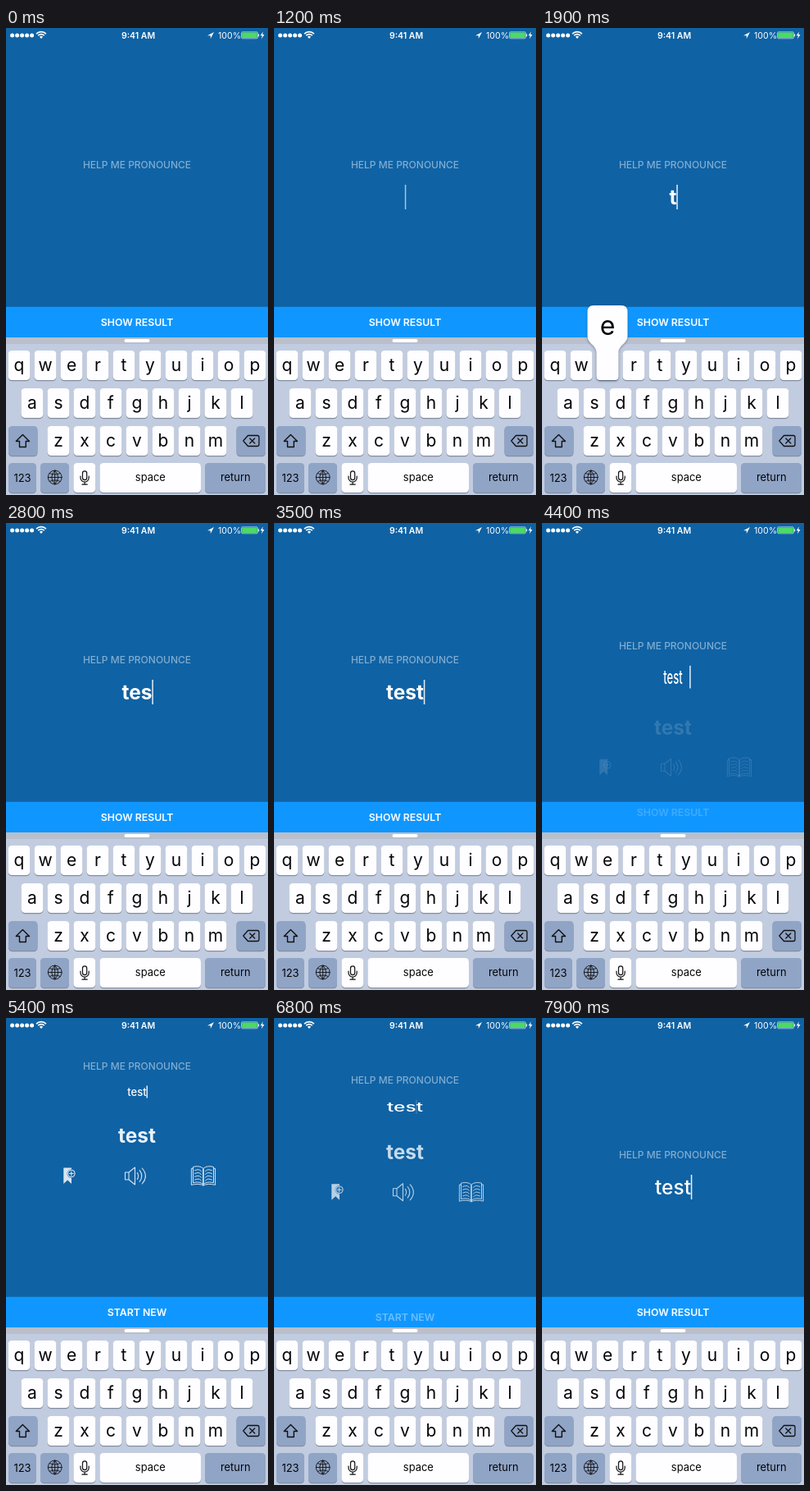
An HTML page with a canvas that plays this animation: 320x569 px, repeating every 8000 ms.

```html
<!DOCTYPE html>
<html lang="en">
<head>
<meta charset="utf-8">
<title>Pronunciation helper</title>
<style>
html, body { margin: 0; width: 100%; height: 100%; overflow: hidden; background: #0f62a4; }
canvas { display: block; width: 320px; height: 569px; }
</style>
</head>
<body>
<canvas id="stage"></canvas>
<script>
const LOOP = 8000, W = 320, H = 569;
const BLUE = '#0f62a4', BUTTON = '#1097ff', KEY = '#fefdff', DARK_KEY = '#90a4c6';
const canvas = document.getElementById('stage');
const dpr = window.devicePixelRatio || 1;
canvas.width = W * dpr;
canvas.height = H * dpr;
const c = canvas.getContext('2d');

const presses = [
  { key: 't', down: 1600, up: 1750 },
  { key: 'e', down: 1800, up: 1960 },
  { key: 's', down: 2150, up: 2300 },
  { key: 't', down: 3000, up: 3150 }
];
const OPEN = 4250, CLOSE = 6650, MOVE = 600;
const cursorKeys = [
  [100, 0], [220, 1], [520, 1], [800, 0], [1080, 0], [1250, 1], [1560, 1], [1610, 0.8], [1750, 1],
  [3650, 1], [3850, 0], [4030, 0], [4200, 1], [4780, 1], [4950, 0], [5180, 0], [5350, 1],
  [5650, 1], [5900, 0], [6150, 0], [6350, 1], [6650, 1], [6840, 0], [7150, 0], [7300, 1],
  [7420, 1], [7530, 0], [7680, 0], [7850, 1]
];

const clamp = v => Math.max(0, Math.min(1, v));
const lerp = (a, b, p) => a + (b - a) * p;
const ease = p => p * p * (3 - 2 * p);
const ramp = (t, start, length) => clamp((t - start) / length);

function track(keys, t) {
  if (t <= keys[0][0]) return keys[0][1];
  for (let i = 1; i < keys.length; i++) {
    const [t0, v0] = keys[i - 1], [t1, v1] = keys[i];
    if (t <= t1) return lerp(v0, v1, (t - t0) / (t1 - t0));
  }
  return keys[keys.length - 1][1];
}

function setFont(size, weight) {
  c.font = `${weight} ${size}px Inter, "Open Sans", sans-serif`;
}

function text(str, x, baseline, size, weight, color, align = 'center') {
  setFont(size, weight);
  c.textAlign = align;
  c.fillStyle = color;
  c.fillText(str, x, baseline);
}

function box(x, y, w, h, r, color) {
  c.beginPath();
  c.roundRect(x, y, w, h, r);
  c.fillStyle = color;
  c.fill();
}

function stroke(path, color, width) {
  c.strokeStyle = color;
  c.lineWidth = width;
  c.lineJoin = c.lineCap = 'round';
  c.stroke(new Path2D(path));
}

function fill(path, color) {
  c.fillStyle = color;
  c.fill(new Path2D(path));
}

function dot(x, y, r, color) {
  c.beginPath();
  c.arc(x, y, r, 0, Math.PI * 2);
  c.fillStyle = color;
  c.fill();
}

function faded(alpha, draw) {
  c.save();
  c.globalAlpha = alpha;
  draw();
  c.restore();
}

function statusBar() {
  for (let i = 0; i < 5; i++) dot(7.6 + i * 6, 9, 2.5, '#fff');
  for (const r of [8.4, 5.4]) {
    c.beginPath();
    c.arc(43, 13, r, -Math.PI * 0.75, -Math.PI * 0.25);
    c.strokeStyle = '#fff';
    c.lineWidth = 1.6;
    c.lineCap = 'butt';
    c.stroke();
  }
  fill('M43 13L40.9 10.7Q43 9 45.1 10.7Z', '#fff');
  text('9:41 AM', 161.5, 12.8, 10.5, 600, '#fff');
  fill('M254 5L246 9.2H249.8V13Z', '#fff');
  text('100%', 259, 12.8, 10.6, 400, '#fff', 'left');
  c.beginPath();
  c.roundRect(287.5, 4.8, 20, 8, 1.5);
  c.strokeStyle = '#d7e5f1';
  c.lineWidth = 0.7;
  c.stroke();
  box(288.2, 5.5, 18.6, 6.6, 0.8, '#4cd964');
  box(308, 7.2, 1.2, 3.2, 0.6, '#d7e5f1');
  fill('M313.8 4.5L310.8 9.3H312.9L312 13.2L315.5 8H313.3Z', '#fff');
}

// Keyboard
const keys = {};
[['qwertyuiop', 16, 393], ['asdfghjkl', 32, 439], ['zxcvbnm', 64, 485]].forEach(([row, x, y]) =>
  [...row].forEach((ch, i) => keys[ch] = { x: x + i * 32, y }));

function keyCap(x, y, w, color = KEY) {
  box(x, y + 1, w, 36.3, 4.5, '#848e9f');
  box(x, y, w, 36, 4.5, color);
}

function keyboard() {
  c.fillStyle = '#c1cce0';
  c.fillRect(0, 377, W, H - 377);
  c.fillStyle = '#b9bfcb';
  c.fillRect(0, 377, W, 8);
  box(144.5, 379, 31, 4, 2, '#fff');

  for (const [ch, k] of Object.entries(keys)) {
    keyCap(k.x - 13.4, k.y, 26.8);
    text(ch, k.x, k.y + 24.5, 21, 400, '#050505');
  }
  keyCap(3, 485, 35.5, DARK_KEY);
  keyCap(281.5, 485, 35.5, DARK_KEY);
  keyCap(3, 530, 34, DARK_KEY);
  keyCap(42, 530, 35, DARK_KEY);
  keyCap(82.5, 530, 26.8);
  keyCap(114.5, 530, 123.5);
  keyCap(243, 530, 74, DARK_KEY);
  text('123', 20, 552.7, 13, 400, '#050505');
  text('space', 176.3, 552, 12.9, 400, '#050505');
  text('return', 280.3, 552, 12.9, 400, '#050505');

  stroke('M20.4 495.5L28.5 503.5H24.3V510.5H16.5V503.5H12.3Z', '#111', 1.4);
  stroke('M295.5 496.5H307Q309 496.5 309 498.5V507.5Q309 509.5 307 509.5H295.5L289.8 503Z' +
    'M297.8 500L303.8 506M303.8 500L297.8 506', '#111', 1.3);
  stroke('M51.3 547.5a8.4 8.4 0 1 0 16.8 0a8.4 8.4 0 1 0-16.8 0H68.1M59.7 539.1V555.9' +
    'M59.7 539.1Q51.5 547.5 59.7 555.9M59.7 539.1Q67.9 547.5 59.7 555.9' +
    'M53.3 542.6Q59.7 545.5 66.1 542.6M53.3 552.4Q59.7 549.5 66.1 552.4', '#111', 0.9);
  stroke('M93.5 542.5a2.6 2.6 0 0 1 5.2 0V548a2.6 2.6 0 0 1-5.2 0Z' +
    'M91 546V548a5.1 5.1 0 0 0 10.2 0V546M96.1 553.2V556.2M93 556.2H99.2', '#111', 1.2);
}

function popup({ x, y }, ch) {
  c.save();
  c.translate(x, y);
  c.shadowColor = 'rgba(20,40,70,.45)';
  c.shadowBlur = 3 * dpr;
  c.shadowOffsetY = dpr;
  fill('M-17-55H17Q24.5-55 24.5-47V-18C24.5-8 13.4-7 13.4 3V31.5Q13.4 36 9 36' +
    'H-9Q-13.4 36-13.4 31.5V3C-13.4-7-24.5-8-24.5-18V-47Q-24.5-55-17-55Z', KEY);
  c.restore();
  text(ch, x, y - 19, 32, 400, '#050505');
}

// Result area
function icons() {
  const ink = '#d8e5f1';
  fill('M70.3 182.5H80V202L75.2 197.5L70.3 202Z', ink);
  dot(79.8, 189.5, 5.2, BLUE);
  stroke('M75.5 189.5a4.3 4.3 0 1 0 8.6 0a4.3 4.3 0 1 0-8.6 0M77.3 189.5H82.3M79.8 187V192', ink, 1.1);
  stroke('M145.5 188H150L157.5 182V203L150 197H145.5ZM150 188V197' +
    'M160.3 188.6Q163 192.5 160.3 196.4M163.2 185.7Q168.5 192.5 163.2 199.3' +
    'M166.2 183Q174.5 192.5 166.2 202', ink, 1.1);
  for (const side of [-1, 1]) {
    c.save();
    c.translate(241, 180);
    c.scale(side, 1);
    stroke('M0 3.5C3 .3 8 .2 12.5 1.5V20.8C8 19.5 3 19.6 0 22.8Z' +
      'M12.5 3.3H14.6V23.4C9 21.8 3 22 0 24', ink, 1);
    for (let y = 6.7; y < 19; y += 3.8) stroke(`M2.5 ${y}Q6-${-y + 2.6 < 0 ? 0 : 0} 6 ${y - 2}T10.5 ${y - 1}`.replace('Q6-0 6', 'Q4.5 ' + (y - 2) + ' 6'), ink, 0.9);
    c.restore();
  }
}

function result(p) {
  if (p <= 0) return;
  faded(p, () => {
    c.translate(0, (1 - p) * 125);
    text('test', 160, 152.3, 24.5, 700, '#e9f1f8');
    icons();
  });
}

function field(t, p) {
  const typed = 'test'.slice(0, presses.filter(k => t >= k.up).length);
  const small = t >= OPEN && t < CLOSE;
  const weight = t < OPEN ? 700 : 500;
  const size = small ? 13 : 24.5;
  const scale = small ? lerp(24.5 / 13, 1, p) : lerp(1, 0.55, p);
  const y = lerp(206, 90, p);
  c.save();
  c.translate(160, y + lerp(9, 5, p));
  c.scale(1, scale);
  text(typed, 0, 0, size, weight, '#fff');
  c.restore();

  setFont(24.5, weight);
  const bigX = 160 + c.measureText(typed).width / 2;
  setFont(13, 500);
  const smallX = 160 + c.measureText(typed).width / 2;
  const height = lerp(30, 15, p);
  faded(track(cursorKeys, t), () => {
    c.fillStyle = '#e4eef7';
    c.fillRect(lerp(bigX, smallX, p) - 0.2, y - height / 2, 1.5, height);
  });
}

function button(t, p) {
  c.save();
  c.beginPath();
  c.rect(0, 339.5, W, 37.5);
  c.clip();
  c.fillStyle = BUTTON;
  c.fillRect(0, 339.5, W, 37.5);
  const label = (str, y, alpha) => faded(alpha, () => text(str, 160, y + 4.6, 12.3, 600, '#fff'));
  const openTap = lerp(1, 0.2, ramp(t, 4000, 60));
  const closeTap = lerp(1, 0.38, ramp(t, 6560, 60));
  if (p < 1) label('SHOW RESULT', 358.4 - 38 * p, t < CLOSE ? openTap : 1 - p);
  if (p > 0) label('START NEW', 358.4 + 38 * (1 - p), t < OPEN + MOVE ? p : closeTap);
  c.restore();
}

function draw(t) {
  const p = t < CLOSE ? ease(ramp(t, OPEN, MOVE)) : 1 - ease(ramp(t, CLOSE, MOVE));
  c.setTransform(dpr, 0, 0, dpr, 0, 0);
  c.fillStyle = BLUE;
  c.fillRect(0, 0, W, H);
  statusBar();
  result(p);
  text('HELP ME PRONOUNCE', 160, lerp(171, 62.8, p), 12, 500, '#80add1');
  field(t, p);
  button(t, p);
  keyboard();
  const pressed = presses.find(k => t >= k.down && t < k.up);
  if (pressed) popup(keys[pressed.key], pressed.key);
}

function tick() {
  draw(performance.now() % LOOP);
  requestAnimationFrame(tick);
}
tick();
</script>
</body>
</html>
```
